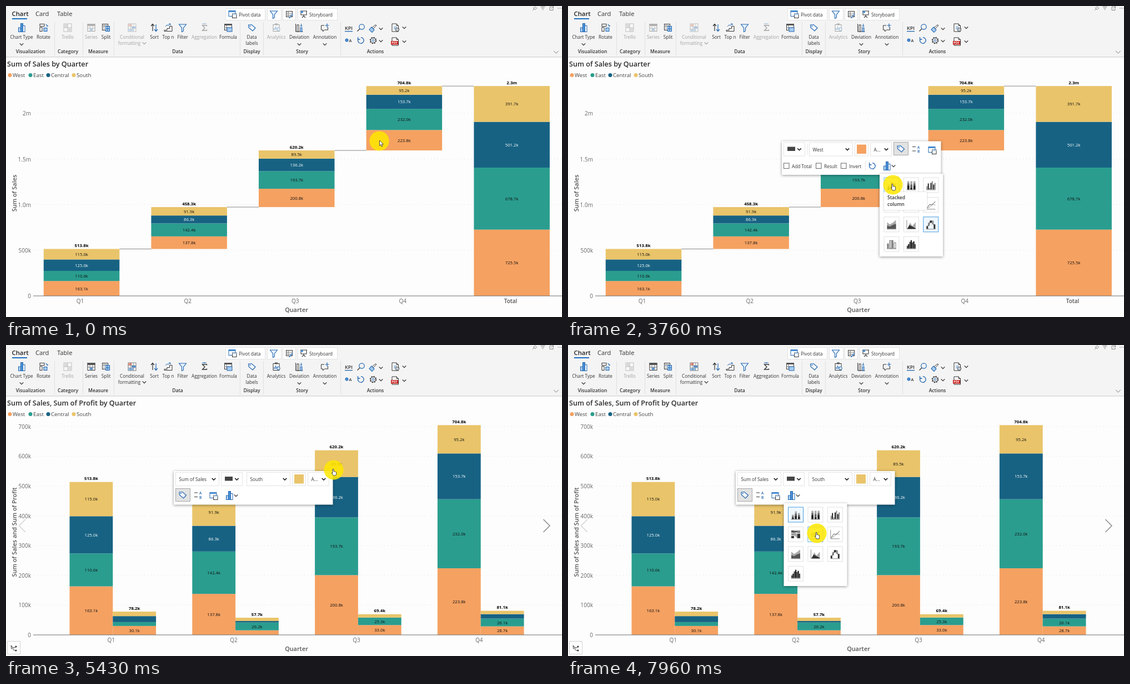
Animation, 1001 px wide and 560 px high, one loop 8000 ms. Source, as an HTML page:

```html
<!DOCTYPE html>
<html lang="en">
<head>
<meta charset="utf-8">
<title>Sales by quarter</title>
<style>
html, body { margin: 0; width: 100%; height: 100%; overflow: hidden; background: #fdfdfd; }
svg { display: block; width: 100vw; height: 100vh; }
text { font-family: "Open Sans", "Noto Sans", sans-serif; white-space: pre; }
.off { opacity: .42; }
.card { fill: #fff; stroke: #e2e2e2; }
.card.sel { fill: #eff7fe; stroke: #4a9fe0; }
.card.hover { stroke: #63b1ee; }
.float { filter: drop-shadow(0 1px 2.5px rgba(0,0,0,.42)); }
</style>
</head>
<body>
<svg id="stage" viewBox="0 0 1001 560" xmlns="http://www.w3.org/2000/svg"></svg>
<script>
const INK = '#333', BLUE = '#2367b0', SKY = '#a9cdf0', MID = '#777';
const COLORS = ['#f5a161', '#2a9d8f', '#176283', '#e9c46a'];
const REGIONS = ['West', 'East', 'Central', 'South'];
const SALES = [
  [163.1, 110.6, 125.0, 115.0],
  [137.8, 142.4, 86.3, 91.9],
  [200.8, 193.7, 136.2, 89.5],
  [223.8, 232.0, 153.7, 95.2]
];
const PROFIT = [
  [30.1, 13, 20, 15.1],
  [15.5, 26.2, 5, 11],
  [33.0, 25.3, 0, 11.1],
  [28.7, 26.1, 15, 11.3]
];
const SALES_SUM = ['513.8k', '458.3k', '620.2k', '704.8k'];
const PROFIT_SUM = ['78.2k', '57.7k', '69.4k', '81.1k'];
const BASE = 522;

// drawing helpers
const rect = (x, y, w, h, fill, more = '') =>
  `<rect x="${x}" y="${y}" width="${w}" height="${h}" fill="${fill}" ${more}/>`;
const box = (x, y, w, h, stroke = '#e3e3e3', fill = '#fff') =>
  rect(x + .5, y + .5, w - 1, h - 1, fill, `stroke="${stroke}"`);
const path = (d, stroke = INK, w = 1, fill = 'none') =>
  `<path d="${d}" stroke="${stroke}" stroke-width="${w}" fill="${fill}"/>`;
const dot = (x, y, r, fill, stroke = 'none') =>
  `<circle cx="${x}" cy="${y}" r="${r}" fill="${fill}" stroke="${stroke}"/>`;
const text = (x, y, s, size, fill = INK, anchor = 'start', weight = 400) =>
  `<text x="${x}" y="${y}" font-size="${size}" fill="${fill}" text-anchor="${anchor}" font-weight="${weight}">${s}</text>`;
const at = (x, y, body, more = '') => `<g transform="translate(${x} ${y})" ${more}>${body}</g>`;
const layer = (id, body, more = '') => `<g id="${id}" ${more}>${body}</g>`;
const chevron = (x, y, r = 3.3, c = INK, w = 1.3) =>
  path(`M${x - r} ${y - r / 2}l${r} ${r} ${r} ${-r}`, c, w);

// icons, each centred on the origin
const icon = {
  bars: rect(-5.5, 0, 4, 7.5, SKY, `stroke="${BLUE}"`) + rect(-1.5, -7.5, 4, 15, '#4a90d6', `stroke="${BLUE}"`) +
    rect(2.5, -3.5, 3.5, 11, '#fff', `stroke="${BLUE}"`),
  rotate: box(-7, -7, 9, 5, INK) + box(-7, -1, 5, 8, INK) + box(0, 0, 7, 7, BLUE, SKY) + path('M4 -6q3 0 3 4m-2 -2l2 2 1.500 -2', BLUE),
  grid: box(-7.5, -7.5, 15, 15, MID) + rect(-6, -6, 6, 6, '#bbb') + rect(1, 1, 5.5, 5.5, '#bbb') + path('M0 -7v14M-7 0h14', MID),
  table: box(-7, -7, 14, 14, INK) + rect(-7, -7, 14, 4, '#555') + path('M-7 1h14M-2.500 -3v10M2.500 -3v10', MID) + rect(-2, 1.500, 4, 4, '#4a90d6'),
  split: box(-7, -7, 11, 12, INK) + path('M-7 -3h11M-3.500 -7v12M0 -7v12', MID) + box(-1, -3, 8, 10, BLUE, SKY) + path('M3 -3v10M-1 2h8', BLUE),
  format: box(-7.5, -7.5, 15, 15, MID) + rect(-6.500, -6.500, 6, 4, '#e58b78') + rect(-1, -2, 7.500, 3.500, '#4a90d6') +
    rect(-6.500, 2.500, 9, 4, '#82b6e6') + path('M-7 -2h14M-7 2h14M-2.500 -7v14M2.500 -7v14', MID, .7),
  sort: path('M-3 6V-6m-3 3l3 -3.500 3 3.500', INK, 1.2) + path('M3 -6V6m-3 -3l3 3.500 3 -3.500', BLUE, 1.2),
  top: path('M-7 6.500h14v-9h-4.500v4h-4.500v3h-5z', INK) + path('M-5 -2l3 -3 2 1 4 -3m-3 0h3v3', BLUE),
  funnel: path('M-6.500 -6h13l-5 6.500v5.500l-3 1.500v-7z', BLUE, 1.1, '#e6f1fb'),
  sigma: path('M4.500 -2.500v-1.500h-8l4.500 4.500 -4.500 4.500h8v-1.500', INK, 1.3) + path('M-4 -7h3m2 0h3', BLUE) + dot(0, -7, 1, BLUE),
  formula: box(-7, -7, 14, 12, INK) + rect(-7, -7, 14, 3, '#555') + path('M-3 -4v9M-7 0h14', MID) + rect(-2, 0, 9, 7, SKY, `stroke="${BLUE}"`),
  tag: path('M-6 -5l5.500 -.5 7 6 -5 5.500 -7 -6z', BLUE, 1.2, '#f2f7fc') + dot(-3.2, -2.8, 1, BLUE),
  report: box(-6, -6, 12, 13, INK) + rect(-2.500, -7.500, 5, 3, '#555') + path('M-3.500 4V1M-1 4V-2M1.500 4V0', BLUE, 1.4) + dot(4, 3, 2.800, '#d9eafa', BLUE),
  deviation: path('M-6.500 -7v14h13', INK) + rect(-4, -5, 3, 12, '#fff', `stroke="${INK}"`) + rect(2, 0, 3, 7, SKY, `stroke="${BLUE}"`) + path('M3.500 -7v5m-2 -2l2 2 2 -2', BLUE),
  note: path('M-1 -4h-5.500v8h3v3l3 -3h6v-5', INK) + path('M4 -7.500v7M.5 -4h7', BLUE, 1.2),
  search: `<circle cx="1.500" cy="-1.500" r="4.700" fill="none" stroke="${BLUE}" stroke-width="1.200"/>` + path('M-2 2l-4.500 4.500', INK, 1.3),
  brush: path('M6 -6l-6 6 -2 -2 6 -5z', INK, 1, '#fff') + path('M-3 -3l5 5 -4 4.500 -5 -5z', BLUE, 1.1, SKY),
  redo: path('M-4.800 -2.500A5.300 5.300 0 1 0 0 -5.300M-5.500 -6v4h4', BLUE, 1.3),
  gear: `<circle r="5.300" fill="none" stroke="${INK}" stroke-width="2" stroke-dasharray="2.100 2.060"/>` + dot(0, 0, 4.5, '#f6f6f6', INK) + dot(0, 0, 1.8, '#fff', BLUE),
  doc: path('M-6 -7h8l3.500 3.500v10.500h-11.500zM2 -7v3.500h3.500', INK, 1, '#fff'),
  pivot: box(-7.5, -7, 13, 11, BLUE) + rect(-7, -6.500, 12, 2.500, '#4a90d6') + box(-1, -1.5, 8.500, 8.500, INK) + rect(-.5, -1, 7.5, 2, SKY),
  lines: path('M-7 -4h6M-7 3.500h6', INK, 1) + text(2, -1, 'A', 6.5, BLUE, 'start', 600) + text(2, 6.500, 'B', 6.5, BLUE, 'start', 600),
  story: path('M-6 -6h12M-5 -6v7h10v-7M0 1v3M-3 6l3 -3 3 3', INK, 1.1) + rect(-5, -6, 4, 3.500, '#4a90d6'),
  edit: box(-6, -6, 12, 11, INK) + path('M-6 -2h12M-2 -6v11M-6 1.500h12', MID) + path('M5.500 -1l-5 6 -1 2 2 -1 5 -6z', BLUE, .8, SKY)
};

function ribbon() {
  let s = rect(0, 0, 1001, 92, '#f4f4f4') + rect(0, 91, 1001, 1, '#d6d6d6') + rect(0, 92, 1001, 1.500, '#efefef');
  s += text(10.5, 18, 'Chart', 11.3, '#222', 'start', 600) + rect(11, 22, 27, 2, '#1f6fc2');
  s += text(53, 18, 'Card', 11.2) + text(92, 18, 'Table', 11.2);
  s += [[395, 72], [470, 26], [498, 24], [525, 72]].map(([x, w]) => box(x, 4, w, 22)).join('');
  s += at(408, 15, icon.pivot) + text(419, 18.500, 'Pivot data', 8.5);
  s += at(482, 15, icon.funnel, 'transform-origin="0 0"') + at(510, 15, icon.edit);
  s += at(536, 15, icon.story) + text(546, 18.500, 'Storyboard', 8.1);
  s += [87, 138, 194, 421, 463, 602].map(x => rect(x, 29, 1, 60, '#e0e0e0')).join('');

  // x, icon, label lines, class: "off" stays greyed, "late" wakes with the second chart
  const tools = [
    [28, 'bars', 'Chart Type'], [67.5, 'rotate', 'Rotate'], [111, 'grid', 'Trellis', 'off'],
    [153.5, 'table', 'Series', 'off late'], [180, 'split', 'Split'],
    [227, 'format', 'Conditional|formatting', 'off late'], [267, 'sort', 'Sort'], [292, 'top', 'Top n'],
    [318, 'funnel', 'Filter'], [357, 'sigma', 'Aggregation', 'off late'], [400, 'formula', 'Formula'],
    [442.5, 'tag', 'Data|labels'], [486.5, 'report', 'Analytics', 'off late'],
    [528, 'deviation', 'Deviation'], [574, 'note', 'Annotation']
  ];
  for (const [x, name, label, cls = ''] of tools) {
    const rows = label.split('|').map((r, i) => text(r == 'formatting' ? -5 : 0, 20 + i * 11, r, 8.2, INK, 'middle'));
    const more = name == 'format' ? chevron(22, 28) : '';
    s += at(x, 39, icon[name] + rows.join('') + more, `class="${cls}"`);
  }
  s += [28, 528, 574].map(x => chevron(x, 69)).join('');
  s += [[44, 'Visualization'], [111.5, 'Category'], [166, 'Measure'], [309, 'Data'], [442.5, 'Display'], [533, 'Story'], [665, 'Actions']]
    .map(([x, n]) => text(x, 85, n, 8.6, INK, 'middle', 600)).join('');

  s += text(617, 43, 'KPI', 9, INK, 'middle', 600) + rect(610, 45, 14, 1.3, BLUE);
  s += at(639, 39, icon.search) + at(661, 41, icon.brush) + at(639, 62, icon.redo) + at(661, 62, icon.gear);
  s += dot(613.5, 61.5, 2.6, '#4a90d6', BLUE) + text(617.5, 64.500, 'A', 7.5, INK, 'start', 600);
  s += at(701, 39, icon.doc + path('M-3 -1h5M-3 2h4', BLUE) + at(3.5, 3.5, icon.gear.replaceAll('#f6f6f6', '#fff'), '').replace('translate(3.5 3.5)', 'translate(3.5 3.5) scale(.6)'));
  s += at(701, 64, icon.doc + rect(-8, -1, 13, 6.500, '#c8201c') + text(-1.5, 4.2, 'PDF', 5.4, '#fff', 'middle', 700));
  s += [[675, 41], [675, 63], [717, 39], [717, 64]].map(([x, y]) => chevron(x, y)).join('') + chevron(990.5, 83, 4.3, MID, 1);
  s += path('M948 8l3 -3M949 3l4 4M950.500 3.500l2 -2.500 3 3 -2.500 2', '#888') + path('M962.500 1.500h8M964 4h5M965.500 6.500h2', '#888');
  s += path('M982 1.500h-3v6h6v-3M981.500 5l4 -4m-3 0h3v3', '#888') + [994, 997, 1000].map(x => dot(x, 4, .8, '#888')).join('');
  return s;
}

function frame(title, yTitle, ticks, last) {
  let s = text(2, 109, title, 12.6, '#2b2b2b', 'start', 600);
  [7, 44, 76, 122].forEach((x, i) => { s += dot(x, 124.500, 3.5, COLORS[i]) + text(x + 5, 128, REGIONS[i], 9.7, '#444'); });
  for (const [label, y] of ticks) {
    s += text(45, y + 4, label, 10, '#666', 'end');
    if (y < BASE) s += `<path d="M51 ${y}H1001" stroke="#dedede" stroke-dasharray="1 5"/>`;
  }
  s += `<text transform="translate(19 337) rotate(-90)" text-anchor="middle" font-size="10.9" font-weight="600" fill="#555">${yTitle}</text>`;
  return s + text(523, 551, 'Quarter', 10.9, '#555', 'middle', 600);
}

function column(x, w, values, scale, from, sum, minLabel = 0) {
  let y = BASE - from * scale, s = '';
  values.forEach((v, i) => {
    const h = v * scale;
    y -= h;
    s += rect(x, y, w, h, COLORS[i]);
    if (v > minLabel) s += text(x + w / 2, y + h / 2 + 3, v.toFixed(1) + 'k', 7.7, i == 2 ? '#fff' : '#111', 'middle');
  });
  return s + text(x + w / 2, y - 3.500, sum, 7.8, '#000', 'middle', 700);
}

const axis = path(`M49 ${BASE}H1001`, '#707070', 1.2);
const quarter = (x, i) => text(x, 535, 'Q' + (i + 1), 10, '#666', 'middle');

function waterfall() {
  const k = .1645, pitch = 193.6, w = 136.5;
  let s = frame('Sum of Sales by Quarter', 'Sum of Sales',
    [['2m', 193], ['1.5m', 275.500], ['1.0m', 357.500], ['500k', 440], ['0', BASE]]);
  let run = 0;
  SALES.forEach((v, i) => {
    const x = 67.800 + i * pitch;
    s += column(x, w, v, k, run, SALES_SUM[i]) + quarter(x + w / 2 - 2.500, i);
    run += v.reduce((a, b) => a + b);
    const y = BASE - run * k;
    s += path(`M${x + w} ${y}h${pitch - w}`, '#888');
  });
  s += column(842.4, w, [725.5, 678.7, 501.2, 391.7], k, 0, '2.3m');
  return s + text(908.500, 535, 'Total', 10, '#555', 'middle', 600) + axis;
}

function stacked() {
  const k = .536, w = 77.8;
  const ticks = Array.from({ length: 8 }, (_, i) => [i ? i + '00k' : '0', BASE - i * 53.6]);
  let s = frame('Sum of Sales, Sum of Profit by Quarter', 'Sum of Sales and Sum of Profit', ticks);
  SALES.forEach((v, i) => {
    const x = 114.5 + i * 220.8;
    s += column(x, w, v, k, 0, SALES_SUM[i]) + column(x + w, w, PROFIT[i], k, 0, PROFIT_SUM[i], 25) + quarter(x + 74.800, i);
  });
  s += axis + path('M35 314l-11.500 11.500 11.500 11.500', '#d4d4d4', 1.5) + path('M967.500 314l11.500 11.500 -11.500 11.500', '#8a8a8a', 1.5);
  s += box(2, 533, 24, 24, '#d2d2d2');
  return s + path('M9 541l4 4 -3 2zM13 546l6 -3M12 548l6 3', INK) + dot(18, 543, 1.5, INK) + dot(18, 550, 1.5, INK);
}

const select = (x, y, w, label) => box(x, y - 12.500, w, 25) + text(x + 6.500, y + 3.500, label, 8.3) + chevron(x + w - 10, y, 3.3, '#222', 1.5);
const pen = (x, y) => box(x, y - 12.500, 39, 25) + rect(x + 7, y - 4.500, 14, 7.500, '#444') + chevron(x + 28.500, y, 3.3, '#222', 1.5);
const swatch = (x, y, c) => box(x, y - 12.500, 25, 25) + rect(x + 4, y - 8.500, 17, 16.500, c, 'rx="1"');
const tagButton = (x, y) => box(x, y - 12, 27, 24, '#a8a8a8', '#e2e2e2') + at(x + 13, y, icon.tag);
const spot = (id, x, y, w, h) => rect(x, y, w, h, '#e0e0e0', `id="${id}" visibility="hidden"`);
const chartButton = (x, y) => at(x, y, icon.bars) + chevron(x + 12, y, 3.3);

function popupOne() {
  let s = rect(385, 243.500, 286.500, 60.500, '#fff', 'class="float"');
  s += spot('pivot1', 644, 249, 24, 21) + spot('chart1', 560, 277, 38, 24);
  s += pen(388, 258) + rect(431, 248, 1, 20, '#e6e6e6') + select(434, 258, 79, 'West') + swatch(516, 258, COLORS[0]) + select(544, 258, 39, 'A...');
  s += tagButton(586, 257) + at(627, 257.500, icon.lines) + at(656, 260, icon.pivot);
  [[388, 'Add Total'], [446, 'Result'], [491, 'Invert']].forEach(([x, n]) => { s += box(x, 282.5, 10.5, 10.5, '#666') + text(x + 15, 292, n, 8.2); });
  return s + rect(535, 279, 1, 18, '#e6e6e6') + at(548, 288, icon.redo) + chartButton(574, 288);
}

function popupTwo() {
  let s = rect(302, 227, 286.500, 60.500, '#fff', 'class="float"');
  s += spot('pivot2', 362, 262, 24, 21) + spot('chart2', 389, 260, 38, 24);
  s += select(305, 241.5, 79, 'Sum of Sales') + pen(387, 241.5) + select(433, 241.5, 79, 'South') + swatch(515, 241.5, COLORS[3]) + select(543, 241.5, 39, 'A...');
  return s + tagButton(305, 270) + at(346, 270, icon.lines) + at(374, 272, icon.pivot) + chartButton(402, 271);
}

// small grey chart pictures for the picker
const pile = (x, w, top, cuts) => rect(x, top, w, 8 - top, '#aaa') + rect(x, top + cuts, w, 8 - top - cuts, '#666') + rect(x, top + cuts * 2, w, 8 - top - cuts * 2, '#222');
const run = (hs, w, gap, shade) => hs.map((h, i) => rect(-8 + i * (w + gap), 8 - h, w, h, shade(i))).join('');
const foot = path('M-8.500 8.500h17', '#888');
const axes = path('M-8 -8v16h16', '#888');
const mini = {
  stacked: pile(-7, 3.500, 0, 3) + pile(-1.500, 3.500, -6, 4) + pile(4, 3.500, -3, 3.500) + foot,
  full: pile(-7, 3.500, -7, 4) + pile(-1.500, 3.500, -7, 6) + pile(4, 3.500, -7, 4) + foot,
  cluster: run([6, 11, 3, 12, 15, 9, 12], 2, .4, i => i % 2 ? '#222' : '#888') + foot,
  ribbon: path('M-4 -5C0 -5 0 -1 4 -1V7C0 7 0 2 -4 2z', 'none', 0, '#aaa') + rect(-8, -7, 5, 4, '#555') + rect(-8, -2, 5, 4, '#999') +
    rect(-8, 3, 5, 4, '#333') + rect(3, -7, 5, 5, '#888') + rect(3, -1, 5, 8, '#333') + path('M-3 -5h6', '#555', 3),
  line: path('M-8 2l4 -5 5 4 7 -7', '#333', 1.1) + path('M-8 6l5 -5 5 5 6 -6', '#777', 1.1) + foot,
  lines: axes + path('M-7 6l5 -7 4 2 6 -7', '#555') + path('M-7 7l6 -4 4 -5 5 3', '#999'),
  area: path('M-8 8v-12l5 4 5 -3 6 -5v16z', 'none', 0, '#aaa') + path('M-8 8v-6l5 2 5 -3 6 -2v9z', 'none', 0, '#555') + foot,
  areas: axes + path('M-7 8l5 -11 4 6 6 -7v12z', 'none', 0, '#aaa') + path('M-7 8l4 -7 5 3 6 3v1z', 'none', 0, '#333'),
  steps: rect(-8, 3, 3, 5, '#333') + rect(-5, -3, 3, 5, '#777') + rect(-2, -7, 4, 4, '#333') + rect(2, -5, 3, 5, '#888') + rect(5, 0, 3, 8, '#333') + path('M-6 2h3M-3 -3h3M2 -6h3M4 0h3', '#555') + foot,
  mekko: rect(-8, -1, 3, 9, '#777') + box(-4, -7, 5, 15, '#777', '#ccc') + rect(1, -7, 2, 15, '#666') + box(4, -3, 4, 11, '#777') + foot,
  histogram: run([5, 8, 12, 15, 11, 13, 8], 2.3, 0, i => i % 2 ? '#222' : '#444') + foot
};
const KINDS = Object.keys(mini);

// each card remembers its corner for the hover test
function menu(x, y, kinds, chosen) {
  const cards = kinds.map((k, i) => {
    const cx = x + 21.5 + i % 3 * 35.4, cy = y + 20.5 + Math.floor(i / 3) * 35.4;
    return `<rect class="card${k == chosen ? ' sel' : ''}" x="${cx - 13.5}" y="${cy - 13.5}" width="27" height="27"/>` + at(cx, cy, mini[k]);
  });
  return rect(x, y, 114, 149, '#fff', 'class="float"') + cards.join('');
}

const tooltip = rect(568.500, 335, 78, 32.500, '#fff', 'style="filter:drop-shadow(0 0 1px rgba(0,0,0,.25))"') +
  text(575, 347.500, 'Stacked', 8.5, INK, 'start', 600) + text(575, 360, 'column', 8.5, INK, 'start', 600);
const halo = dot(0, 0, 17.6, 'rgba(255,232,0,.85)');
const arrow = path('M.5 -1v9.500l2.200 -2 1.600 3.700 1.700 -.8 -1.600 -3.500h3z', '#222', .8, '#fff');
const hand = path('M-2 -1.200q1.200 -1.200 2 0v4q1 -.8 1.800 .3 1 -.6 1.700 .5 1.200 -.3 1.200 1v2.400q0 1.500 -1 3h-4.200l-2.800 -4q-.7 -1.500 .6 -1l.7 .8z', '#222', .8, '#fff');

const stage = document.getElementById('stage');
stage.innerHTML = rect(0, 0, 1001, 560, '#fdfdfd') + ribbon() +
  layer('waterfall', waterfall()) + layer('stacked', stacked()) +
  layer('popup1', popupOne()) + layer('menu1', menu(561, 302, KINDS, 'steps')) + layer('tip', tooltip) +
  layer('popup2', popupTwo()) + layer('menu2', menu(388.5, 285, KINDS.filter(k => k != 'mekko'), 'stacked')) +
  layer('cursor', halo + layer('arrow', arrow) + layer('hand', hand));

const LOOP = 8000;
const SHOW = {
  waterfall: [0, 4000], stacked: [4000, LOOP], popup1: [730, 4000], menu1: [2360, 4000], tip: [3760, 4000],
  popup2: [5430, LOOP], menu2: [6660, LOOP], arrow: [0, 1660], hand: [1660, LOOP]
};
const ease = { lin: p => p, out: p => p * (2 - p), both: p => p * p * (3 - 2 * p) };
const TRACK = [
  [0, 672, 243], [1630, 672, 243], [1760, 628, 273, 'lin'], [2130, 591, 288, 'out'],
  [2997, 591, 288], [3030, 593, 297, 'lin'], [3460, 585, 322, 'out'],
  [4500, 585, 322], [4630, 587, 268, 'lin'], [4860, 590, 225, 'out'],
  [5830, 590, 225], [6230, 425, 279, 'both'], [6430, 416, 271, 'out'],
  [7570, 416, 271], [7960, 448, 339, 'both']
];

function pointer(t) {
  const i = TRACK.findIndex(k => k[0] > t);
  if (i < 1) return (i ? TRACK.at(-1) : TRACK[0]).slice(1, 3);
  const a = TRACK[i - 1], b = TRACK[i];
  const p = ease[b[3] || 'lin']((t - a[0]) / (b[0] - a[0]));
  return [a[1] + (b[1] - a[1]) * p, a[2] + (b[2] - a[2]) * p];
}

const byId = id => document.getElementById(id);
const shown = Object.entries(SHOW).map(([id, span]) => [byId(id), span]);
const area = el => ['x', 'y', 'width', 'height'].map(n => +el.getAttribute(n));
const spots = ['pivot1', 'chart1', 'pivot2', 'chart2'].map(id => [byId(id), area(byId(id))]);
const cards = [...document.querySelectorAll('.card')].map(el => [el, area(el)]);
const late = [...document.querySelectorAll('.late')];
const HOVER_LAG = 70;

function draw(t) {
  for (const [el, [from, to]] of shown) el.style.display = t >= from && t < to ? '' : 'none';
  for (const el of late) el.classList.toggle('off', t < 4000);
  byId('cursor').setAttribute('transform', `translate(${pointer(t).map(v => v.toFixed(2)).join(' ')})`);
  const [hx, hy] = pointer(Math.max(0, t - HOVER_LAG));
  const over = ([x, y, w, h]) => hx >= x && hx <= x + w && hy >= y && hy <= y + h;
  for (const [el, a] of spots) el.setAttribute('visibility', over(a) ? 'inherit' : 'hidden');
  for (const [el, a] of cards) el.classList.toggle('hover', over(a));
}

const start = performance.now();
function tick() {
  draw((performance.now() - start) % LOOP);
  requestAnimationFrame(tick);
}
tick();
</script>
</body>
</html>
```
